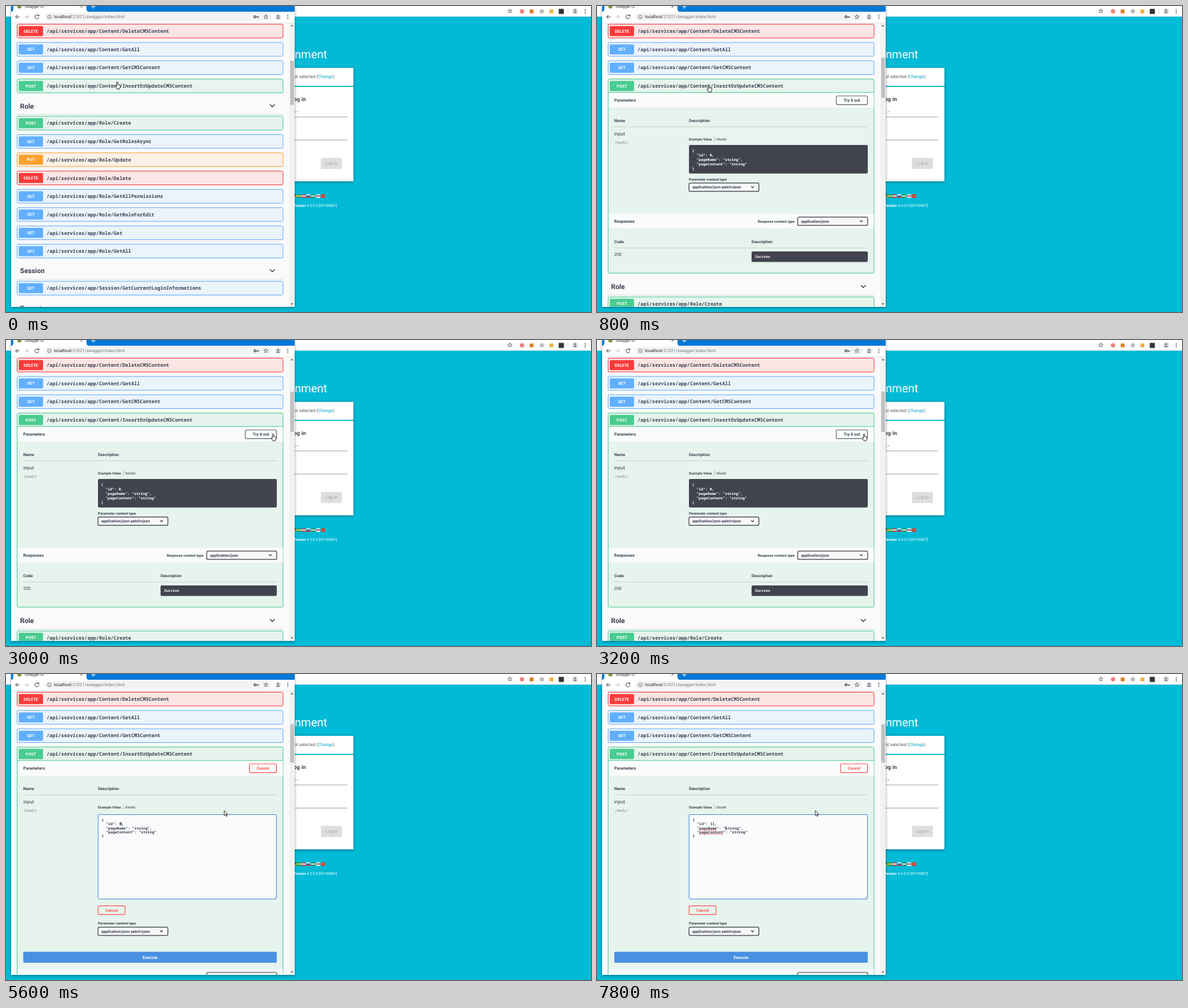
Write an HTML page that moves like this. It is 916 px wide and 480 px high and loops after 8 s.

```html
<!DOCTYPE html>
<html lang="en">
<head>
<meta charset="utf-8">
<title>API explorer</title>
<style>
  html, body { margin: 0; width: 100%; height: 100%; overflow: hidden; background: #00bad6; }
  svg { display: block; width: 916px; height: 480px; }
  text { white-space: pre; text-rendering: geometricPrecision; font-family: Roboto, "Open Sans", sans-serif; }
  .mono { font-family: "Noto Sans Mono", "DejaVu Sans Mono", monospace; }
</style>
</head>
<body>
<svg id="stage" viewBox="0 0 916 480"></svg>
<script>
const LOOP = 8000;
const INK = '#3b4151', SLATE = '#41444e', RED = '#ff5a5a', BLUE = '#4990e2';
const METHODS = {
  GET: ['#61affe', '#ebf3fb'],
  POST: ['#49cc90', '#e6f4ed'],
  PUT: ['#fca130', '#fbf0e5'],
  DELETE: ['#fb3b3b', '#fbe5e5']
};

// Shape helpers; text is placed by its vertical middle.
const rect = (x, y, w, h, fill, extra = '') =>
  `<rect x="${x}" y="${y}" width="${w}" height="${h}" fill="${fill}" ${extra}/>`;
const line = (x1, y1, x2, y2, color, width = 1) =>
  `<path d="M${x1} ${y1}L${x2} ${y2}" stroke="${color}" stroke-width="${width}"/>`;
const stroke = (d, color, width = 1) =>
  `<path d="${d}" fill="none" stroke="${color}" stroke-width="${width}"/>`;
const dot = (x, y, r, fill) => `<circle cx="${x}" cy="${y}" r="${r}" fill="${fill}"/>`;
const label = (x, y, str, size, { fill = INK, weight = 400, anchor = 'start', extra = '' } = {}) =>
  `<text x="${x}" y="${y + size * 0.35}" font-size="${size}" font-weight="${weight}" fill="${fill}" text-anchor="${anchor}" ${extra}>${str}</text>`;
const bold = (x, y, str, size = 6.5, fill = INK, anchor = 'start') =>
  label(x, y, str, size, { fill, anchor, weight: 700 });
const mono = (x, y, str, size = 5.72, fill = INK, weight = 600, extra = '') =>
  label(x, y, str, size, { fill, weight, extra: `class="mono" ${extra}` });
const chevron = (x, y, s, width = 1.1) =>
  stroke(`M${x - s} ${y - s / 2}l${s} ${s} ${s} ${-s}`, '#222', width);
const menuDots = (x, y) => [-2.6, 0, 2.6].map(d => dot(x, y + d, 0.85, '#555')).join('');
const star = (x, y) => {
  const points = Array.from({ length: 10 }, (_, i) => {
    const a = i * Math.PI / 5 - Math.PI / 2, r = i % 2 ? 1.5 : 3.5;
    return `${(x + r * Math.cos(a)).toFixed(2)} ${(y + r * Math.sin(a)).toFixed(2)}`;
  });
  return stroke(`M${points.join('L')}Z`, '#555', 0.8);
};
const avatar = (x, y) => dot(x, y, 4.6, '#dcdee2') + dot(x, y - 1.3, 1.6, '#7b8087') +
  `<path d="M${x - 3} ${y + 3}q3-4.4 6 0z" fill="#7b8087"/>`;
const group = (id, body, extra = '') => `<g id="${id}" ${extra}>${body}</g>`;

function head(method, y, path) {
  return rect(20, y - 7.9, 38, 15.8, METHODS[method][0], 'rx="1.7"') +
    bold(39, y, method, 6.4, '#fff', 'middle') + mono(63.5, y, path, 7.62);
}
function row(method, y, path) {
  const [main, tint] = METHODS[method];
  return rect(17.4, y - 10.9, 416.4, 21.6, tint, `rx="2" stroke="${main}" stroke-width="1"`) +
    head(method, y, '/api/services/app/' + path);
}
const section = (y, title) => bold(22, y, title, 10.8) + chevron(417, y - 0.5, 3.8, 1.2) +
  line(17, y + 13.2, 434, y + 13.2, '#d3d5d9', 0.8);
const select = (x, y, value) =>
  rect(x, y, 109.5, 13, '#f7f8f8', `rx="2" stroke="${SLATE}" stroke-width="1.2"`) +
  bold(x + 5.2, y + 6.5, value, 6.05) + chevron(x + 99.5, y + 6.3, 2.1);
const button = (x, y, w, str, color, edge = color) =>
  rect(x, y, w, 13.6, 'none', `rx="2" stroke="${edge}" stroke-width="1.2"`) +
  bold(x + w / 2, y + 6.9, str, 6.4, color, 'middle');
const band = (y, h, title) =>
  rect(18, y + 0.6, 415.4, h, '#d5e3dc') + rect(18, y, 415.4, h, '#f9fcfa') + bold(27, y + 12, title);

function backdrop() {
  const icons = [[808, '#e8837c'], [823, '#d9822b'], [839, '#bdbdbd'], [854, '#f2b13c']];
  const flags = [['#3b3b3b', '#d9342b', '#f0c530'], ['#2c9a48', '#f0d03a', '#2c9a48'], ['#df2f2f', '#fff', '#df2f2f'],
    ['#fff', '#3b5db3', '#d9342b'], ['#248f48', '#e6f3e8', '#248f48'], ['#fff', '#d8324a', '#fff'], ['#e0302c', '#ee5a30', '#e0302c']];
  return rect(0, 0, 916, 480, '#00bad6') + rect(0, 0, 916, 16.5, '#fff') + rect(0, 16, 916, 0.7, '#d4d8da') +
    star(789, 8) + icons.map(([x, c], i) => i % 2 ? rect(x - 3, 5.5, 6, 6, c) : dot(x, 8.3, 3.4, c)).join('') +
    rect(865.5, 4.5, 8, 8, '#333') + line(880, 4, 880, 13, '#ccc', 0.7) + avatar(891, 8) + menuDots(907, 8.3) +
    label(503, 75.5, 'Assignment', 18, { fill: '#fff', anchor: 'end' }) +
    rect(380, 97, 164, 178, '#fff', 'filter="url(#soft)"') +
    label(514, 111, 'Not selected (<tspan fill="#00a5c4">Change</tspan>)', 6.8, { fill: '#555', anchor: 'end' }) +
    rect(380, 125.2, 164, 1.7, '#00b3cf') +
    bold(469.5, 146, 'Log in', 8.6, '#444', 'end') +
    label(458, 167, 'Email *', 6.4, { fill: '#999', anchor: 'end' }) +
    line(380, 174, 534.5, 174, '#8f8f8f', 0.8) + line(380, 210.3, 534.5, 210.3, '#8f8f8f', 0.8) +
    rect(493, 238.3, 33, 17.4, '#dedede', 'rx="1"') +
    label(509.5, 247, 'Log in', 7, { fill: '#a3a3a3', anchor: 'middle' }) +
    flags.map((f, i) => f.map((c, j) => rect(447 + i * 7.7, 295.6 + j * 1.75, 6.6, 1.8, c)).join('')).join('') +
    label(518.5, 313, '<tspan font-weight="700">Version</tspan> 4.3.0.0 [20190807]', 5.75, { fill: '#fff', anchor: 'end' });
}

function browserBar() {
  return rect(8, 0, 444, 472, '#fafafa', 'filter="url(#soft)"') + rect(8, 0, 444, 9, '#0078d7') +
    `<path d="M9 9q2.5-1 2.5-5V0H126v4q0 4 2.5 5z" fill="#fff"/>` +
    dot(21, 0.8, 3.3, '#7d9b3c') + label(29, 0.8, 'Swagger UI', 6, { fill: '#444' }) +
    stroke('M116.5-.8l3.4 3.4m0-3.4l-3.4 3.4', '#555', 0.8) + stroke('M133.5 1h6.4M136.7-2v6.2', '#fff', 1) +
    rect(8, 9, 444, 17.5, '#fff') + rect(8, 26, 444, 0.7, '#d8dadd') +
    rect(60, 10.7, 356, 12.6, '#f1f3f4', 'rx="6.3"') +
    stroke('M21.5 17h-6.6m3-3l-3 3 3 3', '#444', 1) + stroke('M37.4 17h-6.4', '#fff', 0) +
    stroke('M28.8 17h6.6m-3-3l3 3-3 3', '#bbb', 1) +
    stroke('M51 15.2a3.1 3.1 0 1 0 .4 2.6M51.6 13.4v2.2h-2.2', '#444', 1) +
    `<circle cx="68" cy="17" r="2.9" fill="none" stroke="#666" stroke-width=".8"/>` + line(68, 16.5, 68, 18.7, '#666', 0.8) +
    label(75, 17, 'localhost<tspan fill="#777">:21021/swagger/index.html</tspan>', 6.75, { fill: '#222' }) +
    `<circle cx="389.8" cy="17" r="1.6" fill="none" stroke="#444" stroke-width="1.2"/>` + stroke('M391.3 17h4v1.6m-1.6-1.6v1.3', '#444', 1.1) +
    star(407, 17) + avatar(426, 17) + menuDots(441.3, 17);
}

const scrollbar = () => rect(444, 27, 8, 445, '#f1f1f1') + group('thumb', '') +
  '<path d="M445.7 31.8l2-2.4 2 2.4zM445.7 466.4l2 2.4 2-2.4z" fill="#444"/>';

function roleList() {
  const calls = [['POST', 'Create'], ['GET', 'GetRolesAsync'], ['PUT', 'Update'], ['DELETE', 'Delete'],
    ['GET', 'GetAllPermissions'], ['GET', 'GetRoleForEdit'], ['GET', 'Get'], ['GET', 'GetAll']];
  return section(156.8, 'Role') + calls.map(([m, p], i) => row(m, 183.8 + i * 28.68, 'Role/' + p)).join('') +
    section(415.6, 'Session') + row('GET', 442.7, 'Session/GetCurrentLoginInformations') + section(474.5, 'Tenant');
}

const JSON_LINES = ['{', '  "id": 0,', '  "pageName": "string",', '  "pageContent": "string"', '}'];

const paramHead = () => band(136, 24, 'Parameters') +
  bold(27, 179.3, 'Name', 6.4) + bold(144, 179.3, 'Description', 6.4) + line(27, 189.5, 424, 189.5, '#c3cfca', 0.8) +
  label(27, 200.3, 'input', 7.6) + mono(27.8, 214, '(body)', 5.72, '#777', 400, 'font-style="italic"') +
  bold(144, 208.6, 'Example Value', 5.45) + line(184, 204.3, 184, 213, '#9aa5a3', 0.7) + label(187, 208.6, 'Model', 5.6);
const contentType = y => bold(144, y, 'Parameter content type', 5.6) + select(144, y + 6.1, 'application/json-patch+json');
const responses = y => band(y, 23.6, 'Responses') + bold(309.3, y + 12, 'Response content type', 5.6, INK, 'end') +
  select(314.3, y + 5.2, 'application/json');

const openBody = () => paramHead() + button(374.7, 141, 48.8, 'Try it out', INK, '#666a73') +
  rect(144, 218, 280, 44.8, SLATE, 'rx="2"') + JSON_LINES.map((s, i) => mono(149, 226.6 + i * 7.1, s, 5.72, '#fff')).join('') +
  contentType(271.6) + responses(326) +
  bold(27, 369.6, 'Code', 6.4) + bold(242, 369.6, 'Description', 6.4) + line(27, 379.5, 424, 379.5, '#c3cfca', 0.8) +
  label(27, 390, '200', 7) + rect(242, 385, 182, 16.6, SLATE, 'rx="2"') +
  mono(247, 393.3, 'Success', 5.72, '#fff', 700, 'font-style="italic"');

const editBody = () => paramHead() + button(381.3, 141, 42.3, 'Cancel', RED) + group('editor', '') +
  stroke('M419.5 352l3-3m-1.2 3l1.2-1.2', '#888', 0.6) +
  button(144.2, 363.7, 42.2, 'Cancel', RED) + contentType(391) +
  rect(27, 435.7, 397, 17.2, BLUE, 'rx="2"') + bold(225.5, 444.3, 'Execute', 6.6, '#fff', 'middle') + responses(462.8);

// Editor text with the focus ring, caret and spelling marks of the moment.
function editor({ id, caret, marks }) {
  const shift = caret ? 0.8 : 0, x = 149 + shift, pitch = 3.432;
  const lineY = i => 228.2 + shift + i * 6.25;
  const lines = JSON_LINES.map((s, i) => i === 1 ? s.replace('0', id) : s);
  const wave = (i, n) => stroke(`M${x + 3 * pitch} ${lineY(i) + 3.2}` + 'q.9-1 1.7 0t1.7 0'.repeat(n), '#e53935', 0.8);
  let out = rect(144.2, 220.5, 279.3, 132.5, '#fafbfc', `rx="1.5" stroke="${caret ? BLUE : '#eef2f1'}" stroke-width="1"`) +
    lines.map((s, i) => mono(x, lineY(i), s)).join('');
  if (marks) out += wave(2, 8) + wave(3, 11);
  if (caret) {
    const cx = x + caret[1] * pitch, cy = lineY(caret[0]);
    out += line(cx, cy - 3.2, cx, cy + 3, '#111', 0.7);
  }
  return out;
}

const POINTERS = {
  hand: '<path d="M2.2 1.3c0-1.4 1.9-1.4 1.9 0v3l2.8.6q1.3.3 1.1 1.7l-.5 2.6-.8 1.9H3L.5 7.5c-.6-.9.4-1.7 1.1-1l.6.6z" fill="#fff" stroke="#111" stroke-width=".9"/>',
  arrow: '<path d="M0 0v7.8l1.8-1.6 1.3 2.9 1.2-.5-1.3-2.8h2.4z" fill="#fff" stroke="#111" stroke-width=".8"/>',
  none: ''
};

// Panel layouts: height of the open call, shift of the list below, scroll thumb.
const VIEWS = {
  closed: { height: 21.6, shift: 0, thumb: [86, 69] },
  loading: { height: 101.8, shift: 81, thumb: [85, 67] },
  open: { height: 304.4, shift: 283.4, thumb: [81, 63] },
  edit: { height: 500, shift: 480, thumb: [79, 60] }
};
const VIEW_STEPS = [[0, 'closed'], [600, 'loading'], [800, 'open'], [3600, 'edit']];
const POINTER_STEPS = [[0, 'hand', 171, 119], [200, 'hand', 172, 124], [1200, 'hand', 171, 163],
  [1600, 'hand', 186, 239], [2000, 'hand', 305, 190], [2200, 'hand', 425, 148], [2600, 'hand', 415, 147],
  [3800, 'none', 0, 0], [4800, 'arrow', 341.8, 214.3]];
const EDIT_STEPS = [
  [0, { id: '0' }], [4600, { id: '0', caret: [1, 9] }],
  [5800, { id: '', caret: [1, 8], marks: true }], [6000, { id: '1', caret: [1, 9], marks: true }],
  [6200, { id: '11', caret: [1, 10], marks: true }],
  ...[6600, 6800, 7000, 7200, 7600, 7800].map((at, i) => [at, { id: '11', caret: [2, 10 + i], marks: true }])
];

const stage = document.getElementById('stage');
const [postColor, postTint] = METHODS.POST;
stage.innerHTML = `<defs>
    <filter id="soft" x="-10%" y="-10%" width="120%" height="120%"><feDropShadow dx="0" dy="1" stdDeviation="2" flood-color="#000" flood-opacity=".4"/></filter>
    <clipPath id="page"><rect x="8" y="26.7" width="436" height="445"/></clipPath>
  </defs>` + backdrop() + browserBar() +
  `<g clip-path="url(#page)">` +
  row('DELETE', 39.4, 'Content/DeleteCMSContent') + row('GET', 68.1, 'Content/GetAll') + row('GET', 96.8, 'Content/GetCMSContent') +
  rect(17.4, 114.6, 416.4, 21.6, postTint, `id="post" rx="2" stroke="${postColor}"`) +
  head('POST', 125.5, '/api/services/app/Content/InsertOrUpdateCMSContent') +
  group('loading', stroke('M222.2 162.4a5.1 5.1 0 1 0 3.3-1.2', '#444', 1.7)) +
  group('open', openBody()) + group('edit', editBody()) +
  group('split', line(17.4, 135.6, 433.8, 135.6, postColor, 0.9)) +
  group('roles', roleList()) + '</g>' + scrollbar() + group('pointer', '');

const el = id => document.getElementById(id);
const current = (steps, t) => steps.filter(s => s[0] <= t).pop();
const show = (id, on) => el(id).setAttribute('display', on ? 'inline' : 'none');
let shown = '';

function draw(t) {
  const view = current(VIEW_STEPS, t), pointer = current(POINTER_STEPS, t), edit = current(EDIT_STEPS, t);
  const key = [view[0], pointer[0], edit[0]].join();
  if (key === shown) return;
  shown = key;

  const name = view[1], { height, shift, thumb } = VIEWS[name];
  for (const id of ['loading', 'open', 'edit']) show(id, id === name);
  show('split', name !== 'closed');
  el('post').setAttribute('height', height);
  el('roles').setAttribute('transform', `translate(0 ${shift})`);
  el('thumb').innerHTML = rect(445, thumb[0], 6, thumb[1], '#c1c1c1');
  el('editor').innerHTML = editor(edit[1]);
  el('pointer').innerHTML = POINTERS[pointer[1]];
  el('pointer').setAttribute('transform', `translate(${pointer[2]} ${pointer[3]})`);
}

const start = performance.now();
function tick() {
  draw((performance.now() - start) % LOOP);
  requestAnimationFrame(tick);
}
tick();
</script>
</body>
</html>
```
